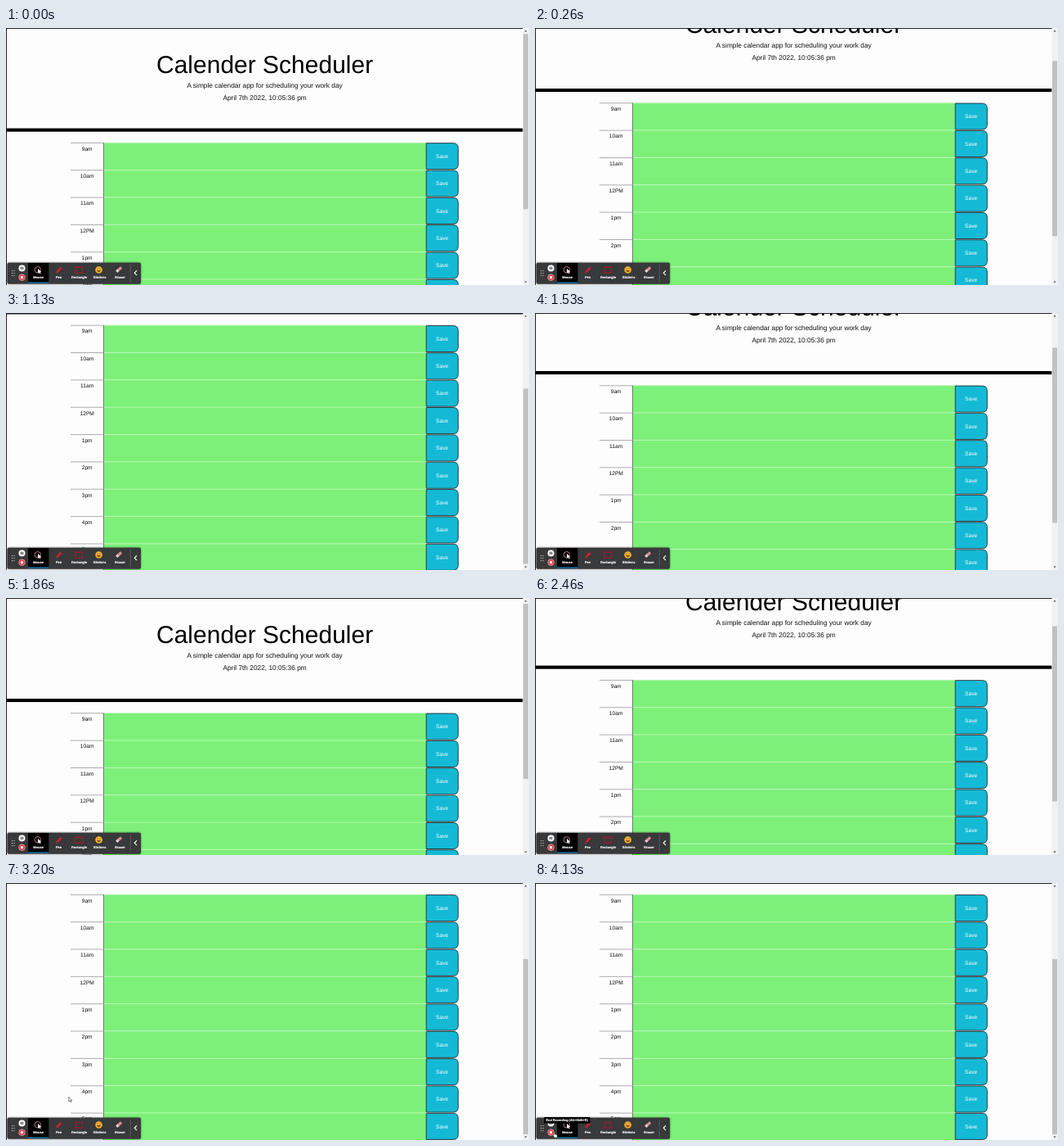
An HTML page for the animation above (4200 ms loop, 640x314 px).

```html
<!DOCTYPE html>
<html lang="en">
<head>
<meta charset="utf-8">
<title>Scheduler</title>
<style>
html, body { margin: 0; width: 100%; height: 100%; overflow: hidden; background: #fdfdfd; }
svg { display: block; width: 640px; height: 314px; font-family: "Liberation Sans", Arial, sans-serif; }
text { text-anchor: middle; fill: #111; text-rendering: geometricPrecision; }
.hour, .save { font-size: 6.67px; }
.save { fill: #fff; }
.lead { font-size: 8.33px; }
.tool { font-size: 4px; font-weight: bold; fill: #fff; stroke: #fff; stroke-width: .15px; }
.bar { filter: drop-shadow(0 0 1.2px #0009); }
</style>
</head>
<body>
<svg viewBox="0 0 640 314">
  <rect width="640" height="314" fill="#fdfdfd"/>
  <g id="page">
    <text x="316.6" y="55.2" font-size="30" style="fill:#000">Calender Scheduler</text>
    <text class="lead" x="316.6" y="73.2">A simple calendar app for scheduling your work day</text>
    <text class="lead" x="316.6" y="88.2">April 7th 2022, 10:05:36 pm</text>
    <rect y="123" width="632.5" height="4.1"/>
    <g id="rows"></g>
  </g>

  <!-- scrollbar -->
  <rect x="632.5" width="7.5" height="314" fill="#f1f1f1"/>
  <rect id="thumb" x="633" y="7" width="6" height="214" fill="#c1c1c1"/>
  <path d="M634.4 4.6h3.2l-1.6-2zM634.4 309.4h3.2l-1.6 2z" fill="#555"/>
  <path d="M0 .5H632.5M.5 0V314" stroke="#222"/>

  <!-- toolbar -->
  <rect class="bar" x="1.5" y="286.8" width="163.5" height="25.9" rx="2" fill="#38393b"/>
  <path d="M7.5 296v8M10 296v8" stroke="#ccc" stroke-dasharray="1.2 1.8"/>
  <circle cx="19.5" cy="293.4" r="4" fill="#fff"/>
  <path d="M18.5 291.7v3.4M20.6 291.7v3.4" stroke="#222"/>
  <circle cx="19.5" cy="304.7" r="3.8" fill="#e5383f" stroke="#f3d5d5" stroke-width=".6"/>
  <rect x="18" y="303.2" width="3" height="3" fill="#fff"/>
  <rect x="27" y="287" width="25.3" height="25" fill="#000"/>
  <path d="M27 311.2H52.3" stroke="#1c8fd0" stroke-width="1.2"/>
  <circle cx="38.8" cy="295.3" r="3.7" fill="none" stroke="#d0808c" stroke-width=".9"/>
  <path d="M39 294v6l1.5-1.4 1 2 1-.5-1-1.9h2z" fill="#fff"/>
  <path d="M61 299.8l1-3.3 2 2z" fill="#d81f2e"/>
  <path d="M63.2 297.3l4.4-4.5" stroke="#d81f2e" stroke-width="2.4"/>
  <rect x="85" y="292.2" width="8.6" height="7" fill="none" stroke="#b3142a"/>
  <circle cx="113.6" cy="295.5" r="4.3" fill="#f3b532"/>
  <path d="M111.4 296.4q2.2 3 4.4 0zM111.2 294h1.500M114.500 294h1.500" fill="#7a3a14" stroke="#8a4416" stroke-width=".7"/>
  <path d="M135.300 297.900l2.500-2.500" stroke="#efd3d8" stroke-width="3.200"/>
  <path d="M137.300 296l3.800-3.500" stroke="#d98a98" stroke-width="3.200"/>
  <g id="tools"></g>
  <path d="M152.300 289V310.500" stroke="#666" stroke-width=".7"/>
  <path d="M160 296.400l-2.700 2.900 2.700 2.900" fill="none" stroke="#fff" stroke-width="1.200"/>

  <g id="tip">
    <rect x="11" y="286" width="56.500" height="7.700" rx="1" fill="#050505"/>
    <text class="tool" x="39.200" y="291.200" style="font-size:3.800px">End Recording (Alt+Shift+R)</text>
  </g>
  <g id="cursor" stroke="#333" stroke-width=".6" fill="#fff">
    <path id="arrow" d="M0 0v5.500l1.300-1.200 1 2 .9-.4-.9-1.900h1.700z"/>
    <path id="hand" d="M.3 0q.9-.3 1 .6v2.200l2.600.7q.7.300.500 1.300l-.4 2.400h-2.600l-2.400-3 .6-.5.700.500z"/>
  </g>
</svg>
<script>
const $ = id => document.getElementById(id);
const hours = ['9am', '10am', '11am', '12PM', '1pm', '2pm', '3pm', '4pm', '5pm'];
const ROW = 33.35, LOOP = 4200;

$('rows').innerHTML = hours.map((hour, i) => `<g transform="translate(0 ${140.6 + i * ROW})">
  <rect x="119.5" width="394.5" height="${ROW}" fill="#7df07a"/>
  <path d="M119.5 .1H514" stroke="#c4f8c1" stroke-width=".8"/>
  <path d="M79 .2H119.5" stroke="#8a8a8a" stroke-width=".7"/>
  <path d="M119.5 0V${ROW}" stroke="#333" stroke-width=".6"/>
  <path d="M514.3 .5H547.3q6 0 6 6V26.5q0 6-6 6H514.3z" fill="#14bad5" stroke="#1c2c30" stroke-width=".9"/>
  <text class="hour" x="99.2" y="9.5">${hour}</text>
  <text class="save" x="533.7" y="18.8">Save</text></g>`).join('');

$('tools').innerHTML = ['Mouse', 'Pen', 'Rectangle', 'Stickers', 'Eraser'].map((name, i) =>
  `<text class="tool" x="${39.6 + i * 25}" y="306.2">${name}</text>`).join('');

// wheel notches: start ms, end ms, distance
const notches = [
  [-15, 240, 41.7], [200, 450, 41.7], [400, 900, 43.1],
  [1110, 1380, -41.7], [1330, 1620, -41.7], [1560, 1866, -43.1],
  [2100, 2510, 41.7], [2470, 2820, 41.7], [2760, 3130, 43.1]
];

const ease = (t, from, to) => {
  const u = Math.min(1, Math.max(0, (t - from) / (to - from)));
  return u * u * (3 - 2 * u);
};
const show = (id, on) => $(id).setAttribute('visibility', on ? 'visible' : 'hidden');
const move = (id, x, y) => $(id).setAttribute('transform', `translate(${x} ${y})`);

function draw() {
  const t = Math.floor((performance.now() % LOOP + 7) * 0.015) / 0.015;
  const scroll = notches.reduce((sum, [from, to, d]) => sum + d * ease(t, from, to), 0);
  move('page', 0, -scroll);
  move('thumb', 0, scroll * 0.68);

  const path = ease(t, 3200, 3670), shown = t > 3130, over = t > 3600;
  move('cursor', 76.8 - 54 * path, 261.5 + 42.5 * path);
  show('arrow', shown && !over);
  show('hand', over);
  show('tip', t > 3790);
  requestAnimationFrame(draw);
}
draw();
</script>
</body>
</html>
```
